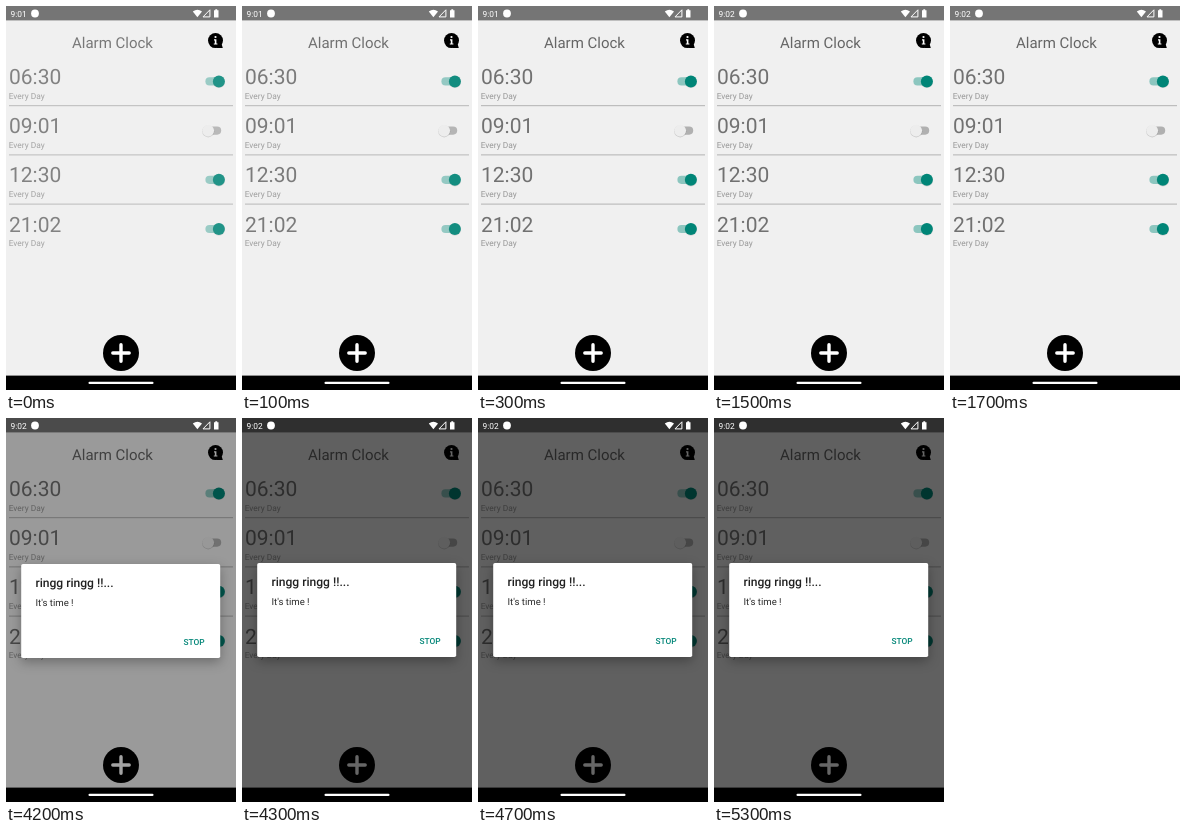
An HTML page for the animation above (8000 ms loop, 230 by 384 pixels).

```html
<!DOCTYPE html>
<html lang="en">
<head>
<meta charset="utf-8">
<title>Alarm clock</title>
<style>
  html, body { margin: 0; width: 100%; height: 100%; overflow: hidden; background: #000; }
  svg { display: block; width: 230px; height: 384px; font-family: Roboto, Arial, sans-serif; }
  text { text-rendering: geometricPrecision; }

  .heading { font-size: 15px; fill: #656565; text-anchor: middle; }
  .time { font-size: 21px; fill: #717171; }
  .days { font-size: 8.4px; fill: #979797; }
  .rule { stroke: #b2b2b2; stroke-width: 1; }
  .status { font-size: 8.4px; fill: #fff; }
  .title { font-size: 12.1px; font-weight: 500; fill: #212121; }
  .message { font-size: 9.6px; fill: #2b2b2b; }
  .action { font-size: 8.4px; font-weight: 500; fill: #008577; }
  .card { filter: drop-shadow(0 4px 6px rgba(0, 0, 0, .3)); }

  /* All changes are hard steps within one 8 s loop. */
  .content, .before, .after, .scrim, .dialog { animation: 8s step-end infinite; }
  .content { animation-name: settle; }
  .before { animation-name: hide; }
  .after { animation-name: show; }
  .scrim { animation-name: dim; }
  .dialog { animation-name: rise; }

  @keyframes settle {
    0% { opacity: .86; }
    1.25% { opacity: .92; }
    2.5% { opacity: .97; }
    3.75%, 100% { opacity: 1; }
  }
  @keyframes hide {
    0% { opacity: 1; }
    18.75%, 100% { opacity: 0; }
  }
  @keyframes show {
    0% { opacity: 0; }
    18.75%, 100% { opacity: 1; }
  }
  @keyframes dim {
    0% { opacity: 0; }
    51.25% { opacity: .14; }
    52.5% { opacity: .36; }
    53.75%, 100% { opacity: .6; }
  }
  @keyframes rise {
    0% { opacity: 0; transform: translateY(5.4px); }
    51.25% { opacity: .69; transform: translateY(5.4px); }
    52.5% { opacity: 1; transform: translateY(1px); }
    53.75%, 100% { opacity: 1; transform: none; }
  }
</style>
</head>
<body>
<svg viewBox="0 0 230 384">
  <defs>
    <g id="on">
      <rect x="199.4" y="-4.1" width="18" height="8.2" rx="4.1" fill="#8cc6bf"/>
      <circle cx="212.9" cy=".6" r="6.1" opacity=".13"/>
      <circle cx="212.9" r="6" fill="#008577"/>
    </g>
    <g id="off">
      <rect x="198" y="-4.1" width="17.2" height="8.2" rx="4.1" fill="#b0b0b0"/>
      <circle cx="202.2" cy=".7" r="6.1" opacity=".15"/>
      <circle cx="202.2" r="5.9" fill="#ededed"/>
    </g>
  </defs>

  <rect width="230" height="370" fill="#f0f0f0"/>
  <rect width="230" height="14.4" fill="#757575"/>

  <g class="content">
    <text class="heading" x="106.5" y="42.1">Alarm Clock</text>
    <g id="rows"></g>
  </g>

  <g>
    <circle cx="209.5" cy="34.6" r="7.5"/>
    <path d="M210 42.1Q214 42 216.8 42.1L215.6 38Z"/>
    <g fill="#fff">
      <circle cx="209.5" cy="31" r="1.1"/>
      <path d="M208 33.2h2.4v4.2h1v1.2h-3.6v-1.2h1v-3h-.8z"/>
    </g>
  </g>

  <circle cx="115" cy="347" r="18"/>
  <path d="M106.8 347h16.4M115 338.8v16.4" stroke="#fff" stroke-width="3.4" stroke-linecap="round"/>

  <rect class="scrim" width="230" height="370"/>

  <g class="status">
    <text class="before" x="4.6" y="10.6">9:01</text>
    <text class="after" x="4.6" y="10.6">9:02</text>
    <circle cx="29" cy="7.5" r="3.9"/>
    <path d="M186.8 5.6Q191.4 1.8 196 5.6L191.4 11.2Z"/>
    <path d="M203.9 3.8V10.9H197Z" fill="none" stroke="#fff"/>
    <path d="M208 4.2h1.3v-.9h1.9v.9h1.3v7.2h-4.5z"/>
  </g>

  <g class="dialog">
    <rect class="card" x="15.2" y="145" width="199" height="94" rx="1.8" fill="#fff"/>
    <text class="title" x="29.4" y="168.4">ringg ringg !!...</text>
    <text class="message" x="29.4" y="187">It's time !</text>
    <text class="action" x="177.4" y="225.6">STOP</text>
  </g>

  <rect y="369.6" width="230" height="14.4"/>
  <rect x="82.5" y="375.7" width="65" height="2.3" rx="1.1" fill="#fff"/>
</svg>
<script>
  const alarms = [["06:30", "on"], ["09:01", "off"], ["12:30", "on"], ["21:02", "on"]];
  const pitch = 49.2;

  document.getElementById("rows").innerHTML = alarms.map(([time, state], i) => {
    const y = i * pitch;
    const rule = i < alarms.length - 1 ? `<path class="rule" d="M3 ${99.7 + y}H227"/>` : "";
    return `<text class="time" x="3" y="${78 + y}">${time}</text>
      <text class="days" x="2.7" y="${92.8 + y}">Every Day</text>
      <use href="#${state}" y="${75.4 + y}"/>${rule}`;
  }).join("");
</script>
</body>
</html>
```
